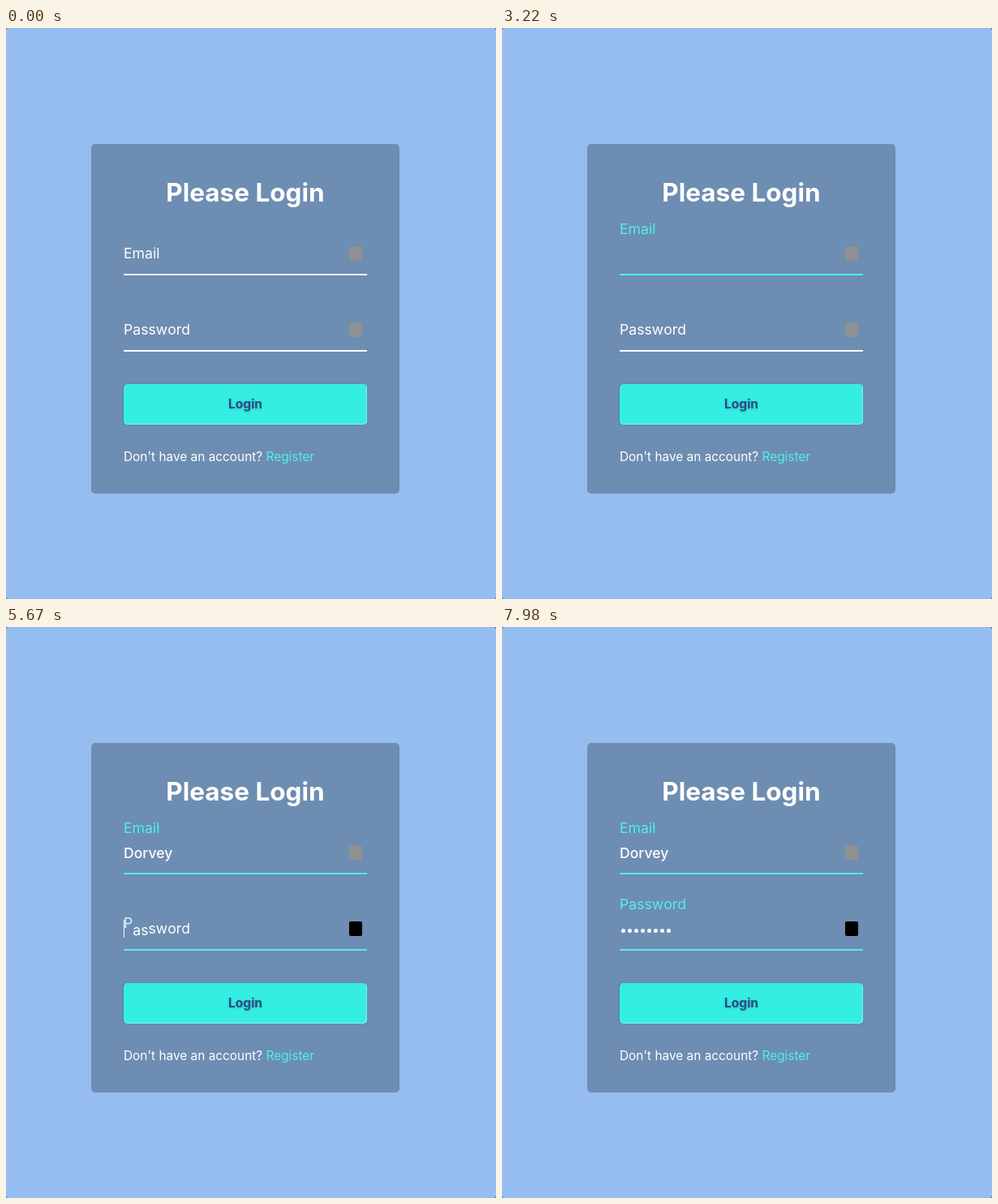
An HTML page for the animation above (8000 ms loop, 604 by 704 pixels).

```html
<!DOCTYPE html>
<html lang="en">
<head>
<meta charset="utf-8">
<title>Login form</title>
<style>
  html, body { margin: 0; width: 100%; height: 100%; overflow: hidden; background: #465a74; }
  body { position: relative; font: 17.6px/30px Inter, sans-serif; color: #fff; white-space: pre; }
  body * { position: absolute; box-sizing: border-box; }
  .page { inset: 0; background: #95bdef; border-radius: 3px; }
  .card { left: 105px; top: 143px; width: 380px; height: 431px; border-radius: 5px; background: #6d8db2; }
  h1 { left: 0; top: 40px; width: 100%; margin: 0; text-align: center; font-size: 31.5px; line-height: 40px; }
  .field { left: 40px; width: 300px; height: 40px; border-bottom: 2px solid #fff; }
  .email { top: 122px; }
  .password { top: 216px; }
  .label { top: -2px; left: 0; }
  .label span { position: relative; display: inline-block; }
  .value { top: -1px; left: 0; font-weight: 500; }
  .dot { top: 13px; width: 5px; height: 5px; border-radius: 50%; background: #fff; }
  .caret { top: 2px; width: 1px; height: 22px; background: #fff; }
  .icon { left: 278px; top: 4px; width: 16px; height: 18px; border-radius: 2px; }
  .button { left: 40px; top: 296px; width: 300px; height: 50px; border-radius: 5px; background: #35eee2;
    box-shadow: inset -1px -1px 1px #7df6f0, -1px 0 2px #4d7fa5; color: #2b4c80; text-align: center;
    font-weight: 700; font-size: 15.6px; line-height: 50px; text-shadow: 0 1px 3px #2b4c8055; }
  .hint { left: 40px; top: 371px; font-size: 15.4px; }
  .hint b { position: static; font-weight: 400; color: #4ef2e8; }
</style>
</head>
<body>
<div class="page">
  <div class="card">
    <h1>Please Login</h1>
    <div class="field email"></div>
    <div class="field password"></div>
    <div class="button">Login</div>
    <div class="hint">Don't have an account? <b>Register</b></div>
  </div>
</div>
<script>
const LOOP = 8000, BLINK = 500, RISE = 300, STAGGER = 50;
const WHITE = [255, 255, 255], TEAL = [78, 242, 232];

const add = (parent, className, text = '') => {
  const el = document.createElement(className ? 'div' : 'span');
  if (className) el.className = className;
  el.textContent = text;
  return parent.appendChild(el);
};

const clamp = (v, lo, hi) => Math.min(hi, Math.max(lo, v));
const cubic = (s, a, b) => 3 * (1 - s) ** 2 * s * a + 3 * (1 - s) * s * s * b + s ** 3;

// cubic-bezier(.68, -.55, .265, 1.55), solved by bisection
function backEase(x) {
  if (x <= 0 || x >= 1) return clamp(x, 0, 1);
  let lo = 0, hi = 1;
  for (let i = 0; i < 24; i++) {
    const mid = (lo + hi) / 2;
    if (cubic(mid, 0.68, 0.265) < x) lo = mid; else hi = mid;
  }
  return cubic(lo, -0.55, 1.55);
}

const mix = p => `rgb(${WHITE.map((c, i) => clamp(c + (TEAL[i] - c) * p, 0, 255))})`;

function makeField(name, options) {
  const box = document.querySelector('.' + name.toLowerCase());
  const label = add(box, 'label');
  const letters = [...name].map(c => add(label, '', c));
  const value = add(box, 'value');
  const dots = Array.from({ length: options.dots || 0 }, (_, i) => {
    const dot = add(box, 'dot');
    dot.style.left = 2 + i * 8 + 'px';
    return dot;
  });
  return { ...options, box, letters, value, dots, caret: add(box, 'caret'), icon: add(box, 'icon') };
}

const fields = [
  makeField('Email', { text: 'Dorvey', focus: 2515, blur: 5543, typeAt: 3620, step: 110, hover: [1890, 2900] }),
  makeField('Password', { dots: 8, focus: 5543, blur: LOOP, typeAt: 6945, step: 75, hover: [4760, LOOP] })
];

function drawField(f, t) {
  f.letters.forEach((el, i) => {
    const p = backEase((t - f.focus - i * STAGGER) / RISE);
    el.style.transform = `translateY(${-30 * p}px)`;
    el.style.color = mix(p);
  });
  f.box.style.borderColor = mix(t >= f.focus ? 1 : 0);

  const total = f.text ? f.text.length : f.dots.length;
  const typed = clamp(Math.floor((t - f.typeAt) / f.step) + 1, 0, total);
  if (f.text) f.value.textContent = f.text.slice(0, typed);
  f.dots.forEach((dot, i) => dot.hidden = i >= typed);

  const lastInput = typed ? f.typeAt + (typed - 1) * f.step : f.focus;
  const lit = Math.floor((t - lastInput) / BLINK) % 2 === 0;
  f.caret.hidden = t < f.focus || t >= f.blur || !lit;
  f.caret.style.left = (f.text ? f.value.offsetWidth : typed * 8) + 'px';

  const hovered = t >= f.hover[0] && t < f.hover[1];
  f.icon.style.background = hovered ? '#000' : '#8e9093';
}

function frame() {
  const t = performance.now() % LOOP;
  fields.forEach(f => drawField(f, t));
  requestAnimationFrame(frame);
}
frame();
</script>
</body>
</html>
```
